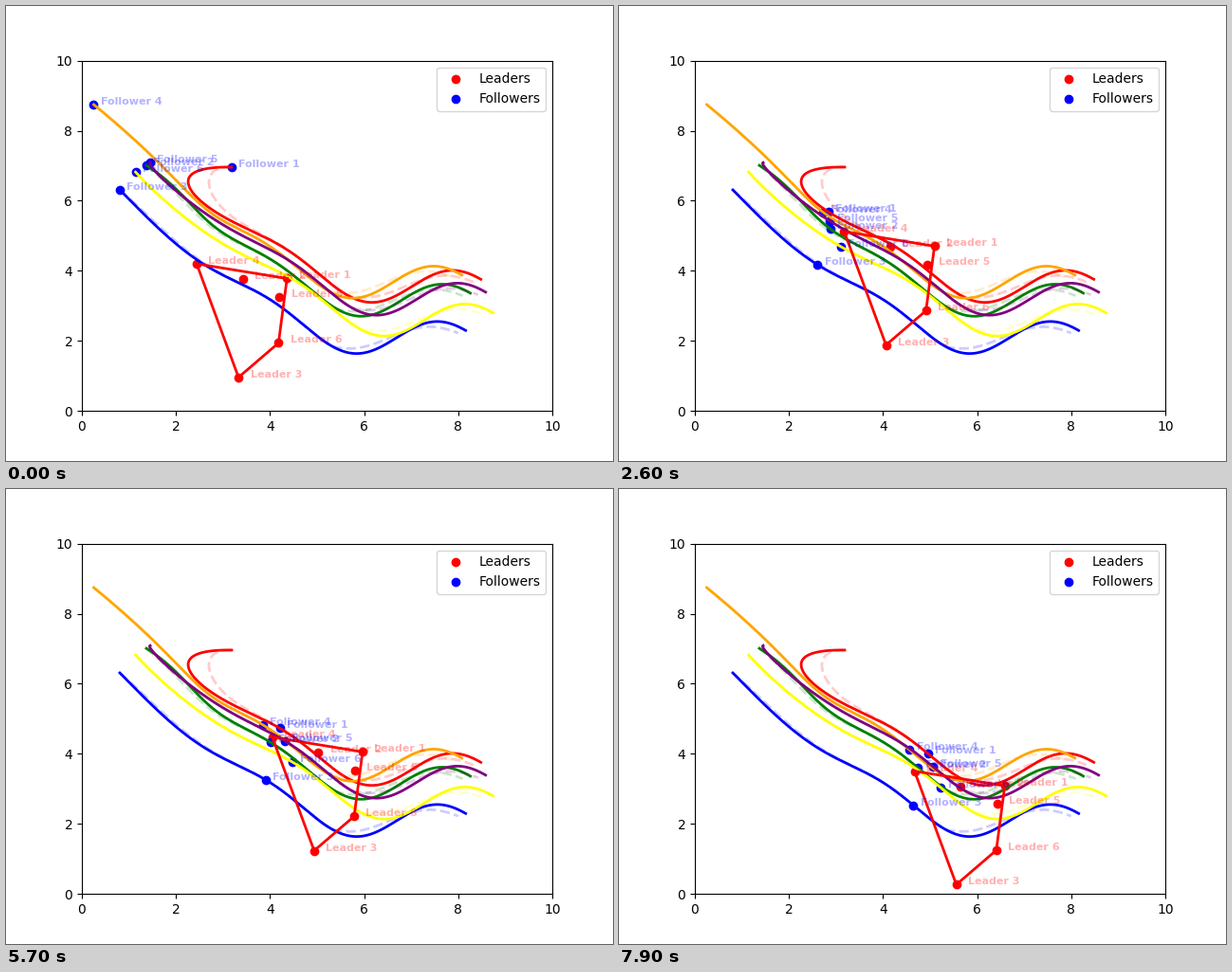
Animation, 640 px wide and 480 px high, one loop 8000 ms. Source, as a matplotlib script:

```python
import numpy as np
import matplotlib.pyplot as plt
from matplotlib.animation import FuncAnimation

FRAMES, INTERVAL = 80, 100
DRIFT, OMEGA = 0.282, 0.5      # leader speed along x, wave frequency
LAG, FOLLOW_AMP = 1.1, 0.5     # followers trail the wave, damped
RATE = 0.33                    # shared approach rate

COLORS = ["red", "green", "blue", "orange", "purple", "yellow"]
FORMATION = np.array([(4.36, 3.78), (3.42, 3.76), (3.33, 0.96),
                      (2.44, 4.20), (4.20, 3.26), (4.18, 1.94)])
HULL = [0, 3, 2, 5, 0]

# Per follower: start, place in the moving formation, early sideways push
START = np.array([(3.185, 6.96), (1.37, 7.01), (0.806, 6.31),
                  (0.252, 8.745), (1.452, 7.09), (1.14, 6.82)])
PLACE = np.array([(2.843, 3.50), (2.62, 3.105), (2.52, 2.04),
                  (2.44, 3.62), (2.944, 3.135), (3.105, 2.54)])
PUSH = np.array([(-1.31, 0.65), (0.67, 0), (-0.06, 0.1),
                 (1.15, -0.65), (-1.0, 1.03), (-0.44, 0.19)])
PLAN_PUSH = PUSH + [(1.2, 0), (0, -0.35), (0, 0.2), (0, 0), (0, 0), (0, 0)]
APPROACH = np.array([-1.45, 4.76])


def leaders_at(t):
    return FORMATION + [DRIFT * t, 0.958 * np.sin(OMEGA * t)]


def wave(t):
    return FOLLOW_AMP * np.sin(OMEGA * t - LAG)


def followers_at(t, push=PUSH):
    """Lagged wave, plus a slow common approach and a fast private one."""
    own = START - PLACE - APPROACH - [0, wave(0)]
    return (PLACE + [DRIFT * t, wave(t)] + APPROACH * np.exp(-RATE * t)
            + (own + push * t) * np.exp(-t))


def plan_at(t):
    """Planned path: near the trough it turns earlier and flatter."""
    turn = 1 / (1 + np.exp(-2 * (t - 10.3)))
    return followers_at(t, PLAN_PUSH) + turn * np.array([-0.16, -0.3 * wave(t)])


fig, ax = plt.subplots(figsize=(6.4, 4.8), dpi=100)
ax.set_xlim(0, 10)
ax.set_ylim(0, 10)

lead_dots = ax.scatter(*leaders_at(0).T, color="red", label="Leaders")
follow_dots = ax.scatter(*followers_at(0).T, color="blue", label="Followers")

times = np.linspace(0, 20, 401)
paths = np.array([followers_at(t) for t in times])
plans = np.array([plan_at(t) for t in times])
for k, color in enumerate(COLORS):
    ax.plot(*plans[:, k].T, "--", color=color, lw=2, alpha=0.2)
    ax.plot(*paths[:, k].T, color=color, lw=2)
hull, = ax.plot([], [], color="red", lw=2)


def make_labels(name, color):
    return [ax.text(0, 0, f"{name} {i}", color=color, alpha=0.3, fontsize=8,
                    fontweight="bold") for i in range(1, 7)]


lead_text = make_labels("Leader", "red")
follow_text = make_labels("Follower", "blue")
ax.legend(loc="upper right")


def place(dots, texts, points, gap):
    dots.set_offsets(points)
    for text, (x, y) in zip(texts, points):
        text.set_position((x + gap, y))


def update(i):
    t = i * INTERVAL / 1000
    lead = leaders_at(t)
    place(lead_dots, lead_text, lead, 0.25)
    place(follow_dots, follow_text, followers_at(t), 0.15)
    hull.set_data(*lead[HULL].T)
    return [lead_dots, follow_dots, hull, *lead_text, *follow_text]


anim = FuncAnimation(fig, update, frames=FRAMES, interval=INTERVAL, repeat=True)
plt.show()
```
